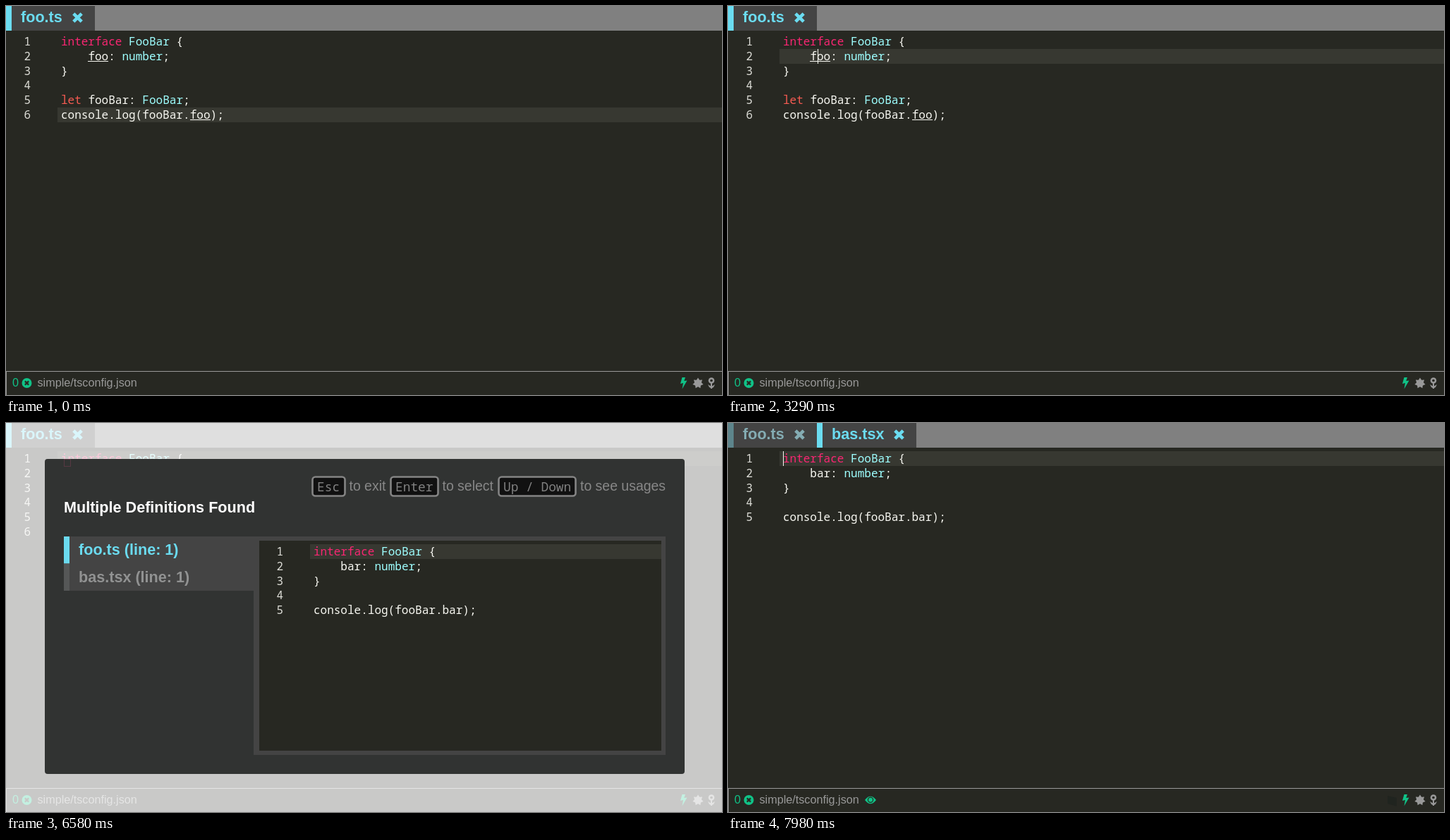
Recreate the animation shown at these times as an HTML page with a canvas. Size 1015 by 552 pixels, loop 8 s.

```html
<!DOCTYPE html>
<html lang="en">
<head>
<meta charset="utf-8">
<title>Multiple definitions</title>
<style>
  html, body { margin: 0; width: 100%; height: 100%; overflow: hidden; background: #272822; }
  canvas { display: block; }
</style>
</head>
<body>
<canvas id="stage" width="1015" height="552"></canvas>
<script>
const ctx = document.getElementById('stage').getContext('2d');
const LOOP = 8000, STEP = 70;
const DIALOG_OPEN = 5460, SELECT_NEXT = 6580, FILE_OPEN = 7840;

const BG = '#272822', PANEL = '#444444', GREY = '#999999', GREEN = '#10c287', TEXT = '#f8f8f2';
const CYAN = [107, 220, 241], DIM = [145, 145, 145], DIM_BAR = [85, 85, 85];
const SANS = '"Liberation Sans", Arial, sans-serif';
const MONO = '"Noto Sans Mono", "DejaVu Sans Mono", monospace';
const TITLE = `bold 21.6px ${SANS}`, STATUS = `16.2px ${SANS}`;

const CELL = 9.62, CODE_X = 77.92;
const WORD_COLORS = { interface: '#f92672', let: '#f55b52', FooBar: '#9effff', number: '#9effff' };
const FOO = ['interface FooBar {', '    foo: number;', '}', '', 'let fooBar: FooBar;', 'console.log(fooBar.foo);'];
const BAS = ['interface FooBar {', '    bar: number;', '}', '', 'console.log(fooBar.bar);'];

// Caret states: start time, line, column, visible
const CARET = [
  [0, 5, 20, 0], [140, 5, 20, 1], [630, 5, 20, 0], [1120, 5, 20, 1], [1610, 5, 20, 0], [2100, 5, 20, 1],
  [2310, 1, 4, 1], [2800, 1, 4, 0], [3290, 1, 5, 1],
  [3710, 1, 7, 1], [3780, 1, 9, 1], [3850, 1, 11, 1], [3920, 1, 13, 1],
  [4060, 0, 13, 1], [4550, 0, 13, 0], [5040, 0, 13, 1], [DIALOG_OPEN, 0, 13, 0], [FILE_OPEN, 0, 0, 1]
];

function rect(x, y, w, h, color) {
  ctx.fillStyle = color;
  ctx.fillRect(x, y, w, h);
}

function text(str, x, y, font, color) {
  ctx.font = font;
  ctx.fillStyle = color;
  ctx.fillText(str, x, y);
}

function shape(points, color) {
  ctx.fillStyle = color;
  ctx.beginPath();
  points.forEach(([x, y]) => ctx.lineTo(x, y));
  ctx.fill();
}

function disc(x, y, r, color) {
  ctx.fillStyle = color;
  ctx.beginPath();
  ctx.arc(x, y, r, 0, 7);
  ctx.fill();
}

function cross(x, y, r, width, color) {
  ctx.strokeStyle = color;
  ctx.lineWidth = width;
  ctx.beginPath();
  ctx.moveTo(x - r, y - r); ctx.lineTo(x + r, y + r);
  ctx.moveTo(x + r, y - r); ctx.lineTo(x - r, y + r);
  ctx.stroke();
}

const mix = (a, b, p) => `rgb(${a.map((v, i) => Math.round(v + (b[i] - v) * p))})`;

// CSS "ease" over 400 ms
function fade(elapsed) {
  const x = Math.min(1, Math.max(0, elapsed / 400));
  let lo = 0, hi = 1;
  for (let i = 0; i < 20; i++) {
    const s = (lo + hi) / 2;
    if (0.75 * s * (1 - s) + s ** 3 < x) lo = s; else hi = s;
  }
  const s = hi, r = 1 - s;
  return 0.3 * r * r * s + 3 * r * s * s + s ** 3;
}

const lineTop = i => Math.round(40.4 + 20.67 * i);

function code(lines, activeLine, right, underlined) {
  const font = `500 ${CELL / 0.6}px ${MONO}`;
  rect(73, lineTop(activeLine), right - 73, 21, '#373831');
  lines.forEach((line, i) => {
    const y = lineTop(i);
    text(i + 1, 25.5, y + 16, font, '#dcdcd6');
    let col = 0;
    for (const part of line.split(/\b(interface|let|FooBar|number|foo)\b/)) {
      const x = CODE_X + col * CELL, color = WORD_COLORS[part] || TEXT;
      text(part, x, y + 16, font, color);
      if (part && part === underlined) rect(Math.round(x), y + 17, Math.round(part.length * CELL), 1, color);
      col += part.length;
    }
  });
}

function tab(x, width, name, dim) {
  const color = mix(CYAN, DIM, dim);
  rect(x, 0, width, 35, PANEL);
  rect(x, 0, 8, 35, mix(CYAN, DIM_BAR, dim));
  text(name, x + 21, 23, TITLE, color);
  cross(x + width - 24.5, 16.5, 5.7, 4.6, color);
}

function statusBar(withPath) {
  rect(0, 518, 1015, 1, GREY);
  rect(0, 518, 1, 34, GREY);
  text('0', 9, 540, STATUS, GREEN);
  disc(29.5, 535, 7, GREEN);
  cross(29.5, 535, 2.6, 2.2, BG);
  text('simple/tsconfig.json', 44.5, 540, STATUS, GREY);
  if (withPath) {
    ctx.fillStyle = GREEN;
    ctx.beginPath();
    ctx.moveTo(194, 535);
    ctx.quadraticCurveTo(202, 524.5, 210, 535);
    ctx.quadraticCurveTo(202, 545.5, 194, 535);
    ctx.fill();
    disc(202, 534.7, 4.2, BG);
    disc(202, 534.7, 3, GREEN);
    shape([[935, 529], [948, 532], [948, 544], [935, 540]], '#20241f');
  }
  shape([[958.5, 527], [963, 527], [961.3, 532], [965.5, 531.5], [958.5, 543.5], [960, 535], [956, 536]], GREEN);
  shape(Array.from({ length: 14 }, (_, i) => {
    const a = i * Math.PI / 7 - Math.PI / 2, r = i % 2 ? 5 : 7.8;
    return [981 + r * Math.cos(a), 535.3 + r * Math.sin(a)];
  }), GREY);
  disc(1000, 531.5, 4.3, GREY);
  disc(1000, 531.5, 1.8, BG);
  rect(999, 535, 2, 8, GREY);
  shape([[995, 537], [1000, 540], [1005, 537], [1003, 541], [1000, 542.5], [997, 541]], GREY);
}

function key(label, x, width) {
  ctx.beginPath();
  ctx.roundRect(x + 1.5, 76.5, width - 3, 27, 4);
  ctx.fillStyle = '#111111';
  ctx.fill();
  ctx.strokeStyle = '#848484';
  ctx.lineWidth = 2.6;
  ctx.stroke();
  text(label, x + 8, 96.5, `17.82px ${MONO}`, '#808080');
}

function row(name, y, dim) {
  rect(82, y, 8, 38.5, mix(CYAN, DIM_BAR, dim));
  text(name, 103, y + 26, TITLE, mix(CYAN, DIM, dim));
}

function dialog(t) {
  rect(0, 0, 1015, 552, 'rgba(255,255,255,0.75)');
  ctx.fillStyle = '#313332';
  ctx.beginPath();
  ctx.roundRect(55, 51, 907, 447, 4);
  ctx.fill();
  ctx.strokeStyle = '#573843';
  ctx.lineWidth = 1;
  ctx.strokeRect(82.5, 51.5, 9, 10);

  const hint = `19.44px ${SANS}`;
  key('Esc', 433, 49);
  text('to exit', 486.5, 96, hint, '#888888');
  key('Enter', 544, 70);
  text('to select', 618.5, 96, hint, '#888888');
  key('Up / Down', 697, 112);
  text('to see usages', 814, 96, hint, '#888888');
  text('Multiple Definitions Found', 82, 126.5, TITLE, '#ffffff');

  const p = fade(t - SELECT_NEXT + 10);
  rect(82, 161, 270, 77, PANEL);
  rect(351, 161, 584, 310, PANEL);
  row('foo.ts (line: 1)', 161, p);
  row('bas.tsx (line: 1)', 199.5, 1 - p);
  rect(359, 167, 570, 298, BG);
  ctx.save();
  ctx.translate(358, 132);
  code(t < SELECT_NEXT ? FOO : BAS, 0, 571);
  ctx.restore();
}

function draw(t) {
  const opened = t >= FILE_OPEN;
  const [, line, col, caretOn] = CARET.findLast(([start]) => start <= t);
  rect(0, 0, 1015, 552, BG);
  rect(0, 0, 1015, 35, '#808080');
  tab(0, 126, 'foo.ts', opened ? fade(t - FILE_OPEN + 10) : 0);
  if (opened) tab(126, 141, 'bas.tsx', 0);

  const underlined = t < 4060 ? 'foo' : t >= 4200 && t < DIALOG_OPEN ? 'FooBar' : null;
  code(opened ? BAS : FOO, line, 1015, underlined);
  if (caretOn) rect(Math.ceil(CODE_X + col * CELL), lineTop(line), 1, 21, TEXT);
  statusBar(opened);
  if (t >= DIALOG_OPEN && !opened) dialog(t);
}

const begin = performance.now();
function tick() {
  const t = (performance.now() - begin) % LOOP;
  draw(Math.floor(t / STEP) * STEP);
  requestAnimationFrame(tick);
}
tick();
</script>
</body>
</html>
```
